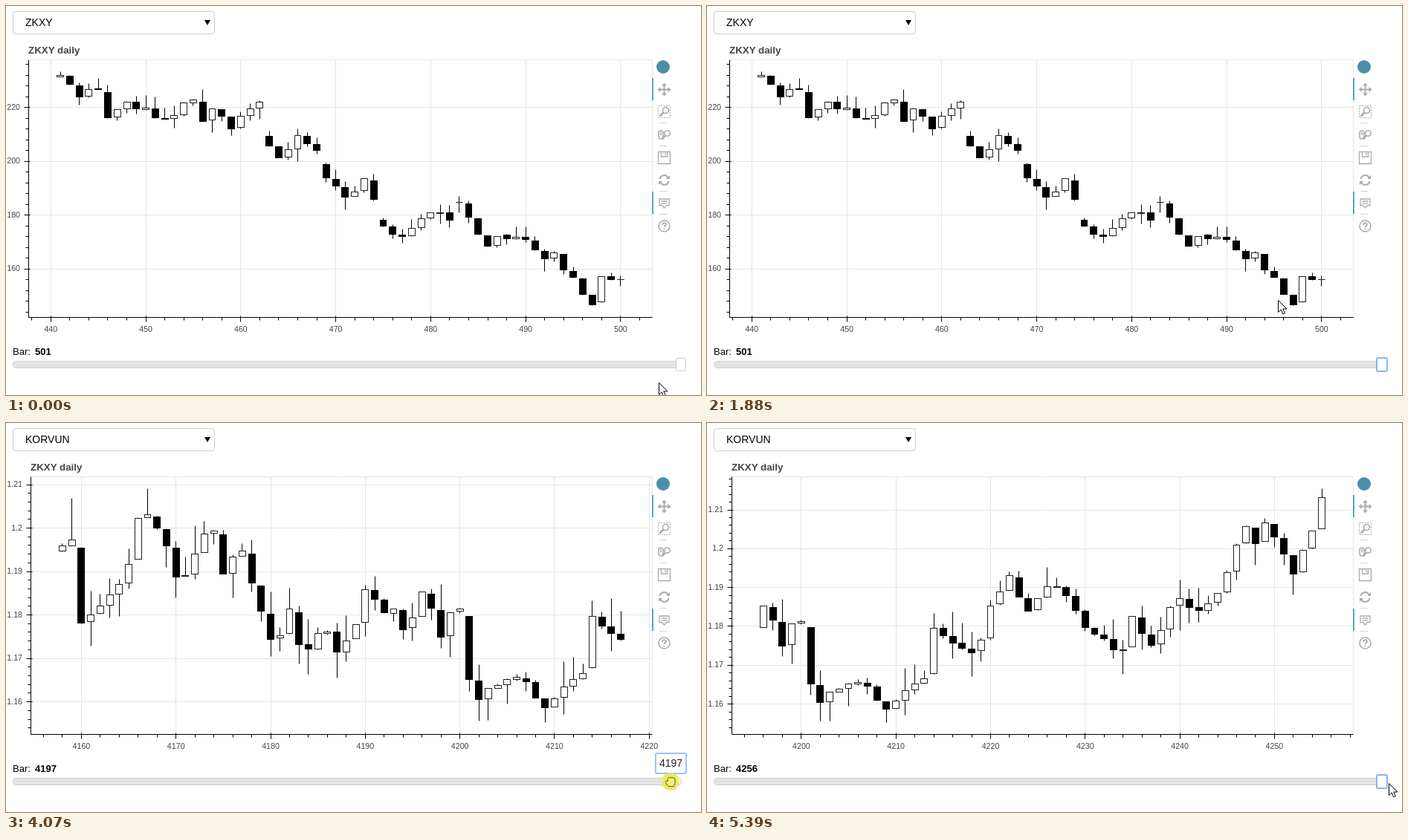
Write an HTML page with a canvas that moves like this. It is 935 by 524 pixels and loops after 5460 ms.

```html
<!DOCTYPE html>
<html lang="en">
<head>
<meta charset="utf-8">
<title>Candles</title>
<style>
html, body { margin: 0; width: 100%; height: 100%; overflow: hidden; background: #fff; }
body { position: relative; font: 13px "Liberation Sans", Arial, sans-serif; color: #000; }
body > * { position: absolute; box-sizing: border-box; }
canvas, #tools { left: 0; top: 0; }
#select { left: 9px; top: 7px; width: 272px; height: 31px; border: 1px solid #ccc; border-radius: 4px;
  font-size: 14px; line-height: 29px; padding-left: 16px; }
#select::after { content: ""; position: absolute; left: 257px; top: 11px;
  border: 4px solid transparent; border-top: 7px solid #000; border-bottom: 0; }
#select.focus { border-color: #66afe9; box-shadow: 0 0 3px 1px #9ccaf0; }
#menu { left: 9px; top: 38px; width: 272px; background: #fff; border: 1px solid #888; font-size: 14px; }
#menu div { padding-left: 16px; line-height: 18px; }
#menu .on { background: #1e90ff; color: #fff; }
#title { top: 52px; font: bold 13.33px/16px "Liberation Sans", Arial, sans-serif; color: #444; }
#bar { left: 9px; top: 458px; line-height: 15px; white-space: pre; }
#bar b { position: absolute; left: 30px; }
#track { left: 9px; top: 478px; width: 900px; height: 10px; border: 1px solid #d0d0d0; border-radius: 4px;
  background: #fafafa; overflow: hidden; }
#fill { height: 100%; background: #e3e3e3; }
#handle { top: 474px; width: 14px; height: 18px; background: #fff; border: 1px solid #ccc; border-radius: 3px; }
#handle.focus { top: 473px; width: 16px; height: 20px; border: 2px solid #8fb3e8; }
#tip { top: 444px; height: 29px; border: 2px solid #a3c0ee; border-radius: 3px; background: #fff;
  font-size: 14px; line-height: 25px; padding: 0 4px; color: #222; }
#arrow, #hand { overflow: visible; left: 0; top: 0; }
</style>
</head>
<body>
<canvas id="chart" width="935" height="524"></canvas>
<svg id="tools" width="935" height="524" fill="none" stroke="#a8abad" stroke-width="1.6">
  <circle cx="884" cy="82" r="9" fill="#4b8fa6" stroke="none"/>
  <path d="M870 97v30M870 250v30" stroke="#55a5c8" stroke-width="2"/>
  <path d="M879 157.5h10M879 188.5h10M879 249.5h10M879 280.5h10" stroke="#d4d4d4" stroke-width="1"/>
  <path d="M885.5 105v15M878 112.5h15" stroke-width="2"/>
  <path d="M885.5 103.5l3.5 4h-7zM885.5 121.5l3.5-4h-7zM876.5 112.5l4-3.5v7zM894.5 112.5l-4-3.5v7z" fill="#a8abad" stroke="none"/>
  <rect x="877.5" y="134.5" width="16" height="16" stroke-width="1" stroke-dasharray="2 1.5"/>
  <circle cx="887.5" cy="140.5" r="4"/><path d="M884.5 143.5l-5 5" stroke-width="2.5"/>
  <rect x="878" y="168" width="6" height="11" rx="3"/><path d="M881 170v4"/>
  <circle cx="889.5" cy="171.5" r="3.7"/><path d="M887 174.5l-4 5" stroke-width="2.2"/>
  <path d="M877.5 196.5h16v16h-16zM881.5 197v6h8v-6M887 198v3" stroke-width="1.3"/>
  <path d="M879.5 233a6 6 0 0 1 11-2M891.5 236a6 6 0 0 1-11 2" stroke-width="2"/>
  <path d="M893 228v5h-5zM878 241v-5h5z" fill="#a8abad" stroke="none"/>
  <path d="M879 260h13v8.5h-3.5l-3 3.500-3-3.500h-3.500zM881.5 263h8M881.5 265.8h8" stroke-width="1.3"/>
  <circle cx="885.5" cy="296.5" r="7.5"/>
  <path d="M883 295c0-4 5-3.500 5-.7 0 1.700-2.500 1.700-2.500 3.700M885.5 299.500v1.800" stroke-width="1.8"/>
</svg>
<div id="select"></div>
<div id="title">ZKXY daily</div>
<div id="bar">Bar: <b></b></div>
<div id="track"><div id="fill"></div></div>
<div id="handle"></div>
<div id="tip"></div>
<div id="menu"><div>ZKXY</div><div>KORVUN</div></div>
<svg id="arrow" width="1" height="1">
  <path d="M.5.5v16l3.700-3.500 2.500 5.800 2.600-1.100-2.500-5.700h5.200z" fill="#fff" stroke="#000"/>
</svg>
<svg id="hand" width="1" height="1">
  <circle r="12" fill="#f0ee4c" fill-opacity=".88"/>
  <path d="M-3 6.500C-6 3-7.500 0-6 -1c1-.6 2 .5 2.300 1V-4.500c0-1.500 2.200-1.500 2.400 0 0-2 2.500-2 2.600 0 .2-1.700 2.500-1.500 2.500.2.5-1.200 2.200-.8 2.200.7V1c0 2.500-1.200 3.500-1.500 5.500z"
    fill="#f4f27c" stroke="#444" stroke-width=".9"/>
</svg>
<script>
const LOOP = 5460, SPAN = 60, LAG = 60;
const SWITCH = 3250, FIRST_BAR = 441;
const $ = id => document.getElementById(id);
const ctx = $("chart").getContext("2d");

// Deterministic noise in 0..1.
const noise = n => { const s = Math.sin(n * 127.1) * 43758.5453; return s - Math.floor(s); };

// Linear interpolation through rows of [position, ...values].
function at(keys, t) {
  const i = keys.findIndex(k => k[0] > t);
  if (i < 0) return keys[keys.length - 1].slice(1);
  if (!i) return keys[0].slice(1);
  const [a, b] = [keys[i - 1], keys[i]], f = (t - a[0]) / (b[0] - a[0]);
  return a.slice(1).map((v, j) => v + (b[j + 1] - v) * f);
}

// Turning points of a price path; a step of 0.1 is a gap before the next open.
// Spikes are the extreme prices, and bars beside them keep short wicks.
function series(turns, spikes, wobble, wick) {
  const fixed = new Set(turns.map(k => k[0]));
  const sway = n => fixed.has(n) ? 0 : (noise(n + 0.3) - 0.5) * wobble;
  return n => {
    const open = at(turns, n - 0.9)[0] + sway(n - 1), close = at(turns, n)[0] + sway(n);
    const calm = [n - 1, n, n + 1].some(k => k in spikes);
    const reach = calm ? wick * 0.1 : wick;
    const spike = spikes[n] ?? close;
    return {
      open, close,
      high: Math.max(open, close, spike) + (n in spikes ? 0 : reach * noise(n) ** 2),
      low: Math.min(open, close, spike) - (n in spikes ? 0 : reach * noise(n + 0.5) ** 2)
    };
  };
}

const stock = series([[425, 217.4], [432, 220.7], [433, 217.7], [441, 232], [443, 224], [445, 226.8], [446, 216.2],
  [448, 222.1], [452, 215.8], [455, 222.9], [456, 214.9], [457, 219.6], [459, 212.2], [462, 222.1], [462.1, 209.4],
  [464, 201.3], [466, 209.7], [468, 204.2], [468.1, 199], [471, 186.6], [473, 193.5], [474, 185.8], [474.1, 178.3],
  [477, 172.2], [480, 180.8], [482, 178.3], [482.1, 184.7], [483, 184.8], [486, 168.4], [487.1, 171.6], [490, 170.9],
  [492, 163.8], [493, 166], [496, 150.7], [497, 146.7], [498, 157.2], [500, 156.1]],
  { 441: 233.4, 497: 146.4 }, 3, 5);

// Currency prices in pips above 1.
const pips = series([[4076, 981], [4077, 999], [4077.1, 1017], [4078, 922], [4081, 859], [4083, 975], [4085, 1159],
  [4086, 1103], [4088, 1236], [4093, 1162], [4097, 1281], [4102, 1198], [4105, 1218], [4109, 1135], [4113, 1180],
  [4114, 1337], [4116, 1438], [4119, 1343], [4124, 1467], [4126, 1397], [4130, 1515], [4131, 1631], [4134, 1646],
  [4135, 1735], [4136, 1675], [4157, 1945], [4159, 1973], [4160, 1782], [4165, 1917], [4166, 2023], [4167, 2030],
  [4170, 1887], [4174, 1994], [4175, 1894], [4177, 1947], [4180, 1743], [4182, 1813], [4183, 1732], [4188, 1740],
  [4190, 1859], [4194, 1766], [4196, 1853], [4198, 1749], [4200, 1813], [4201, 1652], [4202, 1605], [4206, 1656],
  [4209, 1586], [4213, 1665], [4214, 1796], [4218, 1732], [4222, 1930], [4224, 1839], [4226, 1903], [4234, 1739],
  [4235, 1825], [4237, 1751], [4240, 1871], [4243, 1858], [4247, 2058], [4248, 2014], [4249, 2067], [4252, 1934],
  [4255, 2132]],
  { 4081: 839, 4136: 1776, 4159: 2069, 4167: 2091, 4209: 1552, 4255: 2155 }, 50, 65);
const pair = n => Object.fromEntries(Object.entries(pips(n)).map(([k, v]) => [k, 1 + v / 10000]));

// Time, slider value.
const drag = [[300, 501], [540, 498], [690, 493], [750, 492], [900, 489], [1000, 489], [1170, 498], [1230, 499],
  [1330, 501], [SWITCH - 1, 501], [SWITCH, 4256], [3800, 4256], [4010, 4218], [4070, 4197], [4600, 4137],
  [4740, 4137], [5150, 4256]];
// Time, free pointer x, y.
const pointer = [[0, 878, 507], [300, 907, 484], [1450, 908, 484], [1710, 845, 434], [2190, 629, 326],
  [2390, 629, 326], [2730, 204, 48], [2870, 150, 24], [2950, 150, 24], [3080, 145, 64], [SWITCH, 145, 64],
  [3450, 215, 90], [3800, 908, 484], [5390, 917, 485]];

const within = (t, a, b) => t >= a && t < b;
const valueAt = t => Math.round(at(drag, t)[0]);

function tickStep(range) {
  const base = 10 ** Math.floor(Math.log10(range / 6));
  const miss = s => Math.abs(6 - range / s);
  return [1, 2, 5, 10].map(m => m * base).reduce((a, b) => miss(b) < miss(a) ? b : a);
}
function eachTick(from, to, step, fn) {
  for (let i = Math.ceil(from / step); i * step <= to; i++) fn(i * step);
}
function line(x1, y1, x2, y2, color = "#000") {
  ctx.strokeStyle = color;
  ctx.beginPath();
  ctx.moveTo(Math.round(x1) + 0.5, Math.round(y1) + 0.5);
  ctx.lineTo(Math.round(x2) + 0.5, Math.round(y2) + 0.5);
  ctx.stroke();
}

function drawChart(barAt, last, left) {
  const top = 72, right = 869, bottom = 419, grid = "#e5e5e5";
  const first = last - SPAN + 1;
  const shown = Array.from({ length: SPAN }, (_, i) => barAt(first + i));
  const max = Math.max(...shown.map(b => b.high)), min = Math.min(...shown.map(b => b.low));
  const y0 = min - (max - min) * 0.05, y1 = max + (max - min) * 0.05;
  const width = SPAN - 0.3, x0 = first - 0.35 - width * 0.05, x1 = x0 + width * 1.1;
  const scale = (right - left) / (x1 - x0);
  const X = n => left + (n - x0) * scale;
  const Y = p => bottom - (p - y0) / (y1 - y0) * (bottom - top);
  const xStep = tickStep(x1 - x0), yStep = tickStep(y1 - y0);

  ctx.clearRect(0, 0, 935, 524);
  ctx.lineWidth = 1;
  eachTick(x0, x1, xStep, v => line(X(v), top, X(v), bottom, grid));
  eachTick(y0, y1, yStep, v => line(left, Y(v), right, Y(v), grid));
  line(left, top, right, top, grid);
  line(right, top, right, bottom, grid);

  shown.forEach((b, i) => {
    const x = X(first + i), half = 0.35 * scale, falling = b.close < b.open;
    line(x, Y(b.high), x, Y(b.low));
    const l = Math.round(x - half) + 0.5, r = Math.round(x + half) + 0.5;
    const t = Math.round(Y(Math.max(b.open, b.close))) + 0.5;
    const h = Math.round(Y(Math.min(b.open, b.close))) + 0.5 - t;
    ctx.fillStyle = falling ? "#000" : "#fff";
    ctx.strokeStyle = falling ? "#000" : "#222";
    ctx.fillRect(l, t, r - l, h);
    ctx.strokeRect(l, t, r - l, h);
  });

  line(left, top, left, bottom);
  line(left, bottom, right, bottom);
  eachTick(x0, x1, xStep / 5, v => line(X(v), bottom, X(v), bottom + 4));
  eachTick(y0, y1, yStep / 5, v => line(left - 4, Y(v), left, Y(v)));
  ctx.font = '10.67px "Liberation Sans", Arial, sans-serif';
  ctx.fillStyle = "#444";
  const label = (v, x, y) => ctx.fillText(String(+v.toFixed(2)), x, y);
  ctx.textAlign = "center";
  eachTick(x0, x1, xStep, v => {
    line(X(v), bottom - 2, X(v), bottom + 6);
    label(v, X(v) + 0.5, 439);
  });
  ctx.textAlign = "right";
  eachTick(y0, y1, yStep, v => {
    line(left - 6, Y(v), left + 2, Y(v));
    label(v, left - 11, Y(v) + 3.5);
  });
}

function place(el, show, x, y) {
  el.style.display = show ? "block" : "none";
  el.style.transform = `translate(${Math.round(x)}px, ${Math.round(y)}px)`;
}

function render(t) {
  const later = t >= SWITCH, end = later ? 4256 : 501;
  const value = valueAt(t);
  const delayed = within(t, SWITCH, SWITCH + LAG) ? end : valueAt(t - LAG);
  const left = later ? 33 : 30;
  drawChart(later ? pair : stock, delayed - 1, left);
  $("title").style.left = left + "px";
  $("select").textContent = later ? "KORVUN" : "ZKXY";
  $("select").className = within(t, 2890, SWITCH) ? "focus" : "";
  $("menu").style.display = within(t, 2950, SWITCH) ? "block" : "none";
  const pick = t < 3040 ? 0 : 1;
  [...$("menu").children].forEach((row, i) => row.className = i === pick ? "on" : "");

  const held = within(t, 300, 1450) || within(t, 3800, 5390);
  const focus = within(t, 300, 2890) || t >= 3800;
  const x = Math.round(908 - 899 * (end - value) / (end - FIRST_BAR));
  document.querySelector("#bar b").textContent = value;
  $("fill").style.width = x - 9 + "px";
  $("handle").className = focus ? "focus" : "";
  $("handle").style.left = x - (focus ? 8 : 7) + "px";
  const tip = $("tip");
  tip.style.display = held ? "block" : "none";
  tip.textContent = value;
  tip.style.left = Math.round(x - tip.offsetWidth / 2) + "px";

  // The held hand rises slightly as it is pulled left.
  place($("hand"), held, x, 484 - (908 - x) * 0.09);
  place($("arrow"), !held, ...at(pointer, t));
}

const began = performance.now();
function tick() {
  render((performance.now() - began) % LOOP);
  requestAnimationFrame(tick);
}
tick();
</script>
</body>
</html>
```
